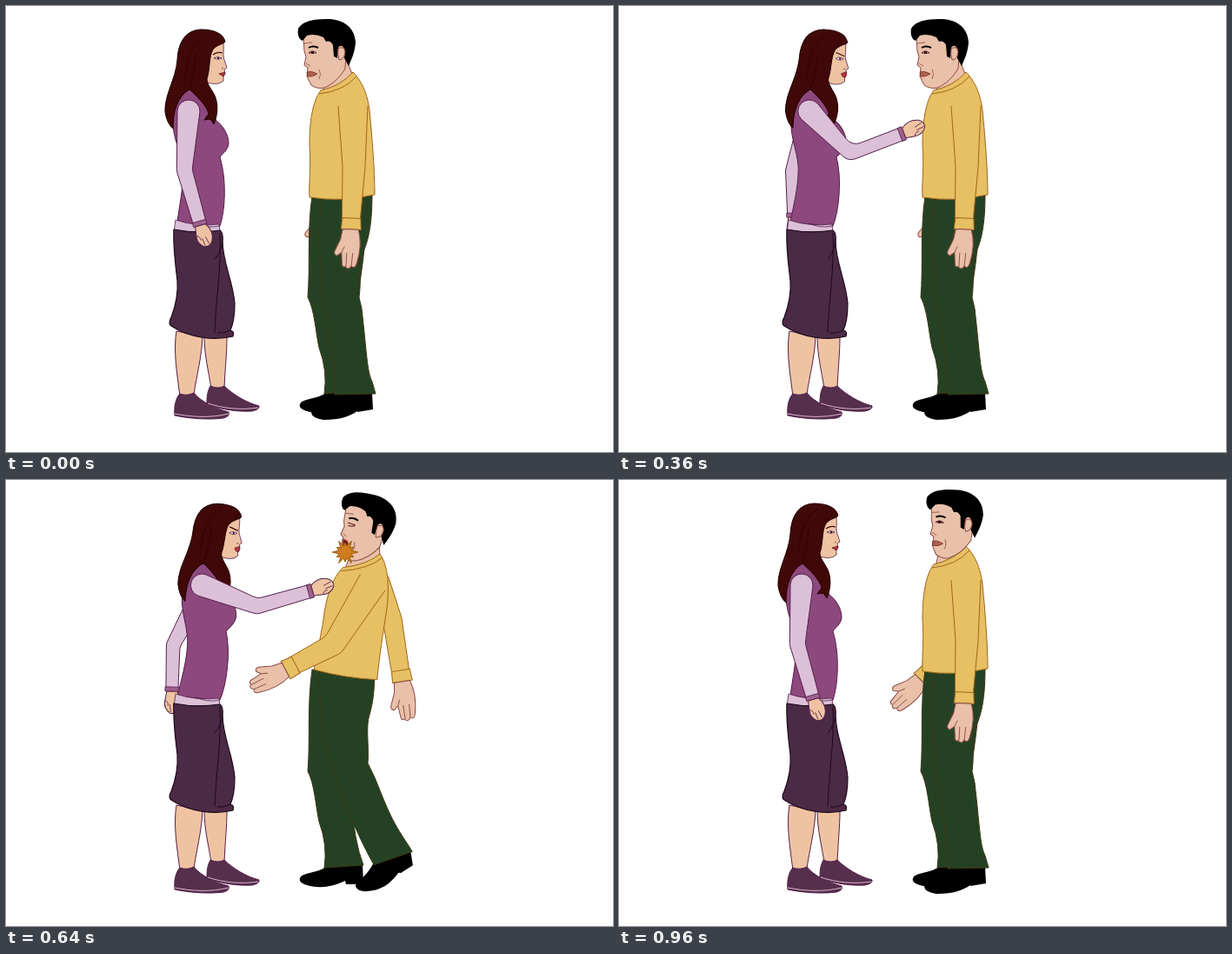
Recreate the animation shown at these times as an HTML page with a canvas. Size 698 by 513 pixels, loop 1200 ms.

```html
<!DOCTYPE html>
<html lang="en">
<head>
<meta charset="utf-8">
<title>Quarrel</title>
<style>
html, body { margin: 0; width: 100%; height: 100%; overflow: hidden; background: #fff; }
canvas { display: block; }
</style>
</head>
<body>
<canvas id="stage" width="698" height="513"></canvas>
<script>
const ctx = document.getElementById('stage').getContext('2d');
const LOOP = 1200, STEP = 40, RAD = Math.PI / 180;

const C = {
  top: '#8d487d', sleeve: '#dcc0d8', cuff: '#a0608f', skirt: '#4b2a45', wSkin: '#efc3a2', wShoe: '#562f4d',
  wHair: '#410808', wLine: '#54204a', sweater: '#e6c063', sLine: '#a2651c',
  pants: '#244223', pLine: '#3f3514', mSkin: '#e9c0a9', skinLine: '#8c4a44', black: '#000'
};

// Time, lean of the body, direction of the upper arm and of the forearm.
const SLAP = [
  [0, 0, 94, 74], [120, -2, 108, 1], [200, -2, 112, -4], [360, 8, 46, -21],
  [480, 15, 9, -31], [640, 14, 21, -16], [800, 4, 67, 42], [960, 0, 94, 74]
];

const lerp = (a, b, k) => Array.isArray(a) ? a.map((v, i) => lerp(v, b[i], k)) : a + (b - a) * k;
const ramp = (t, from, to) => Math.min(1, Math.max(0, (t - from) / (to - from)));
const easeOut = k => 1 - (1 - k) ** 2;
const polar = ([x, y], deg, r) => [x + r * Math.cos(deg * RAD), y + r * Math.sin(deg * RAD)];

function womanPose(t) {
  const i = Math.max(1, SLAP.findIndex(row => row[0] > t));
  const next = t < 960 ? i : SLAP.length - 1;
  const a = SLAP[next - 1], b = SLAP[next];
  const [, lean, upper, fore] = lerp(a, b, ramp(t, a[0], b[0]));
  const shoulder = [210 + lean * 1.1, 121];
  const elbow = polar(shoulder, upper, 68);
  return {
    lean, shoulder, elbow,
    wrist: polar(elbow, fore, 65),
    backShoulder: [209 + lean * 1.1, 130],
    backElbow: [209 - lean * 1.2, 190],
    backWrist: [214 - lean * 1.65, 242]
  };
}

function manPose(t) {
  const recover = ramp(t, 800, 960), jolt = ramp(t, 400, 480);
  const back = (.87 * ramp(t, 480, 570) + .13 * ramp(t, 570, 800)) * (1 - recover);
  const step = easeOut(ramp(t, 500, 800)) * (1 - recover);
  const elbow = lerp([400, 185], [374, 190], back);
  return {
    back, step, elbow,
    head: [16 * jolt + 31 * back, 5 * back - 4 * jolt],
    tilt: 4 * jolt + 10 * back,
    jolt,
    shoulder: lerp([399, 115], [424, 118], back),
    wrist: polar(elbow, lerp(93, 176, step), 72 - 11 * back),
    backShoulder: lerp([402, 120], [430, 115], back),
    backElbow: lerp([386, 190], [450, 158], back),
    backWrist: lerp([369 - 22 * recover, 241 - 11 * recover], [464, 231], back)
  };
}

// Blend two paths that share the same commands.
function morph(a, b, k) {
  const to = b.match(/-?[\d.]+/g);
  let i = 0;
  return a.replace(/-?[\d.]+/g, n => lerp(+n, +to[i++], k).toFixed(2));
}

function draw(d, fill, line, width = 1) {
  const p = new Path2D(d);
  if (fill) { ctx.fillStyle = fill; ctx.fill(p); }
  if (line) { ctx.strokeStyle = line; ctx.lineWidth = width; ctx.stroke(p); }
}

function local([x, y], angle, paint) {
  ctx.save();
  ctx.translate(x, y);
  ctx.rotate(angle);
  paint();
  ctx.restore();
}

function headSpace([dx, dy], deg, [cx, cy], paint) {
  local([cx + dx, cy + dy], deg * RAD, () => {
    ctx.translate(-cx, -cy);
    paint();
  });
}

const angle = (p, q) => Math.atan2(q[1] - p[1], q[0] - p[0]);
const side = (p, a, d) => [p[0] - Math.sin(a) * d, p[1] + Math.cos(a) * d];

// Tapered sleeve; returns the direction of the forearm.
function limb(s, e, w, [r0, r1, r2], fill, line, cap) {
  const a = angle(s, e), b = angle(e, w);
  const m = Math.atan2(Math.sin(a) + Math.sin(b), Math.cos(a) + Math.cos(b));
  ctx.beginPath();
  ctx.moveTo(...side(s, a, r0));
  ctx.arcTo(...side(e, m, r1), ...side(w, b, r2), 14);
  ctx.lineTo(...side(w, b, r2));
  ctx.lineTo(...side(w, b, -r2));
  ctx.arcTo(...side(e, m, -r1), ...side(s, a, -r0), 14);
  ctx.lineTo(...side(s, a, -r0));
  if (cap) ctx.arc(...s, r0, a - Math.PI / 2, a - Math.PI * 1.5, true);
  ctx.fillStyle = fill;
  ctx.fill();
  ctx.strokeStyle = line;
  ctx.lineWidth = 1;
  ctx.stroke();
  return b;
}

function womanHand(wrist, dir) {
  local(wrist, dir, () => {
    draw('M1,-6 C8,-11 16,-11 22,-8 Q28,-4 26,2 Q21,9 13,8 L1,6Z', C.wSkin, C.wLine);
    draw('M24,-4 L15,-2 M25,1 L16,2 M12,8 Q12,4 18,4', null, C.wLine, .8);
    draw('M-4,-8 L1,-8 L1,8 L-4,8Z', C.cuff, C.wLine, .8);
  });
}

function manHand(wrist, dir) {
  local(wrist, dir, () => {
    draw('M-13,-11 L0,-12 L0,11 L-13,10Z', C.sweater, C.sLine);
    draw('M0,-9 C12,-13 24,-13 39,-9 Q46,-7 42,-3 Q48,0 43,4 Q45,8 38,8 L27,9 L31,14 Q30,18 26,17 L12,11 L0,9Z',
      C.mSkin, C.skinLine);
    draw('M42,-3 L27,-4 M43,3 L27,3 M27,9 L20,6', null, C.skinLine, .9);
  });
}

function womanLegs() {
  draw('M196,374 C192,397 197,425 200,449 L216,447 C219,425 225,405 226,380Z', C.wSkin, C.wLine);
  draw('M228,380 C228,402 233,420 236,440 L251,440 C252,415 254,400 254,380Z', C.wSkin, C.wLine);
  draw('M235,437 C231,444 231,452 231,458 C247,464 265,467 283,466 Q292,464 291,460 C276,456 261,447 251,437 Q244,441 235,437Z',
    C.wShoe, C.wLine);
  draw('M200,446 C195,451 193,461 194,471 C212,475 235,476 250,474 Q258,472 256,467 C240,463 224,455 216,445 Q208,449 200,446Z',
    C.wShoe, C.wLine);
  draw('M194,469 C215,473 235,474 256,469 M232,457 C250,463 270,465 290,462', null, '#dcb4c8');
}

function womanHead(angry) {
  draw('M236,45 L250,42 C251,51 249,57 251,62 L254,71 L251,73 L252,78 L250,81 L250,86 Q244,92 231,88 L228,60Z',
    C.wSkin, C.wLine, .8);
  draw('M224,27 C206,28 198,42 197,62 C195,85 182,102 183,122 Q185,135 192,141 C192,122 197,104 211,96 C220,104 231,115 233,124 ' +
    'L228,131 L235,130 L239,136 C244,124 244,112 240,103 C236,95 231,90 231,84 C235,72 233,58 238,50 C243,44 250,44 252,41 C250,32 240,27 224,27Z',
    C.wHair, '#200');
  draw('M228,34 C213,42 208,63 206,85 M218,55 C217,78 213,88 211,96', null, '#250000', .7);
  draw('M239,60 Q243,57 248,60 Q244,63 239,60Z', '#fff', C.wLine, .8);
  draw('M243,59 h2 v2 h-2Z', '#341428');
  draw(angry ? 'M239,53 L249,57' : 'M238,56 Q243,52 249,54', null, C.wHair, 1.2);
  draw(angry ? 'M252,75 L246,77 Q247,82 251,81Z' : 'M252,76 L245,78 L250,81Z', '#b3393f', '#6d1425', .8);
  draw('M250,71 L248,72', null, C.wLine, .8);
}

function drawWoman(t) {
  const p = womanPose(t);
  womanHand(p.backWrist, limb(p.backShoulder, p.backElbow, p.backWrist, [11, 8, 7], C.sleeve, C.wLine));
  womanLegs();

  // The waist stays put while everything above it slants.
  const k = p.lean / 155;
  ctx.save();
  ctx.transform(1, 0, -k, 1, k * 252, 0);
  draw('M212,96 C199,100 191,115 192,138 C194,158 203,172 203,190 C204,212 199,230 197,249 L246,253 C252,236 254,200 246,174 ' +
    'C249,169 255,167 256,158 C256,148 250,138 241,131 C239,115 226,101 212,96Z', C.top, C.wLine);
  ctx.restore();
  draw('M195,246 Q218,254 245,251 L246,260 L193,260Z', C.sleeve, C.wLine, .8);
  draw('M218,250 Q232,256 245,253', null, C.wLine, .8);
  draw('M193,257 Q219,262 246,258 Q250,261 249,270 C249,295 261,316 263,342 Q263,362 258,373 Q263,374 261,380 ' +
    'C240,385 211,382 190,368 Q186,365 190,358 C195,345 198,330 197,316 C195,298 192,278 193,257Z', C.skirt, '#1d0a1a', 1.2);
  draw('M246,261 C248,300 241,340 240,376 M249,268 Q249,281 240,291 M258,373 Q251,377 243,376', null, '#1d0a1a');

  const offset = [p.lean * 1.15, Math.max(0, -p.lean * 1.5)];
  headSpace(offset, p.lean * .2, [222, 95], () => womanHead(t >= 280 && t < 840));
  womanHand(p.wrist, limb(p.shoulder, p.elbow, p.wrist, [13, 9, 7.5], C.sleeve, C.wLine, true));
}

function manHead(hurt) {
  draw('M342,36 L343,52 L345,58 L343,68 L347,71 L346,81 L351,91 Q358,96 366,94 C376,90 384,82 390,72 L392,45 L380,30 L345,30Z',
    C.mSkin, C.skinLine);
  draw('M341,40 C336,38 335,31 336,26 C342,16 357,15 372,15 C389,16 401,25 402,42 C401,54 397,62 394,69 L389,60 ' +
    'C391,48 386,42 382,48 L381,60 L377,58 L376,45 Q373,39 368,41 L365,36 Q355,31 346,34Z', C.black);
  draw('M382,49 Q389,45 390,53 Q389,62 383,62 Q381,56 382,49Z', C.mSkin, C.skinLine);
  draw('M348,48 Q353,45 359,48', null, C.black, 2);
  draw('M343,43 L352,42 M360,73 Q363,78 360,84 M345,66 L350,69', null, C.skinLine, .8);
  if (hurt) {
    draw('M348,53 L357,54 M349,56 Q354,57 357,54', null, '#551a22');
    draw('M346,73 Q354,72 354,79 Q351,85 347,82 Q350,78 346,73Z', '#5c0b12', '#a0503c', 1.4);
  } else {
    draw('M348,54 Q352,50 357,54Z', '#fff', '#551a22');
    draw('M351,52 h3 v3 h-3Z', '#2b1010');
    draw('M346,76 Q351,74 358,78 Q353,82 347,81Z', '#b0604e', '#743025', .8);
  }
}

function manLegs(step) {
  draw('M368,445 C358,452 345,451 339,456 Q335,462 343,465 C360,471 375,468 390,461 L391,465 L411,465 L410,442Z', C.black);
  draw('M352,218 C346,260 350,300 347,335 C355,350 356,375 360,393 Q370,420 366,446 L411,443 Q400,415 397,365 C409,320 414,270 416,222Z',
    C.pants, C.pLine);
  draw(morph(
    'M378,445 C370,455 355,462 351,468 Q352,474 365,476 C385,476 395,472 404,466 L404,467 L422,464 L421,445Z',
    'M440,439 C436,452 425,460 422,466 Q423,472 432,472 C450,471 460,462 470,446 L474,446 L486,435 L483,420Z', step), C.black);
  draw(morph(
    'M362,222 C358,280 363,330 367,350 C375,390 377,420 378,447 L425,446 L421,432 C415,420 415,400 409,348 ' +
    'L406,335 C409,315 405,298 408,290 C414,275 421,262 421,216Z',
    'M360,220 C360,290 375,325 390,352 C400,378 420,414 441,441 L484,420 L477,412 C455,380 450,375 430,340 ' +
    'L420,322 C421,310 418,285 420,270 C423,255 424,250 425,228Z', step), C.pants, C.pLine);
}

function drawMan(t) {
  const p = manPose(t), k = p.back;
  manHand(p.backWrist, limb(p.backShoulder, p.backElbow, p.backWrist, [13, 11, 10], C.sweater, C.sLine));
  manLegs(p.step);

  draw(morph(
    'M367,86 L364,100 Q385,95 398,78 L390,58Z',
    'M398,88 L392,104 Q418,100 433,88 L433,68Z', k), C.mSkin, C.skinLine);
  draw(morph(
    'M362,97 C352,110 349,135 349,160 C351,185 348,205 349,220 Q385,226 424,217 C424,190 421,150 418,120 C415,95 405,82 399,76 Q385,92 362,97Z',
    'M390,101 C378,112 372,130 368,150 C364,180 357,200 355,218 Q390,228 427,231 C431,195 434,185 440,150 C443,130 444,100 433,86 Q418,98 390,101Z', k),
    C.sweater, C.sLine);
  draw(morph('M360,101 Q388,98 403,81', 'M388,105 Q420,103 436,90', k), null, C.sLine);
  headSpace(p.head, p.tilt, [368, 55], () => manHead(t >= 440 && t < 920));
  manHand(p.wrist, limb(p.shoulder, p.elbow, p.wrist, [17, 13, 10], C.sweater, C.sLine));
}

function drawSpark(t) {
  if (t < 480 || t >= 720) return;
  const k = ramp(t, 480, 640);
  const center = lerp([361, 73], [390, 83], Math.min(1, k * 2));
  const size = lerp(8, 14, k);
  ctx.beginPath();
  for (let i = 0; i < 24; i++) {
    ctx.lineTo(...polar(center, i * 15, size * (i % 2 ? .52 : i % 4 ? .8 : 1.05)));
  }
  ctx.closePath();
  ctx.fillStyle = '#cf7d1e';
  ctx.fill();
  ctx.strokeStyle = '#9c5a08';
  ctx.lineWidth = 1;
  ctx.stroke();
}

function render(now) {
  const t = Math.floor((now % LOOP) / STEP) * STEP;
  ctx.fillStyle = '#fff';
  ctx.fillRect(0, 0, 698, 513);
  ctx.lineJoin = 'round';
  drawMan(t);
  drawSpark(t);
  drawWoman(t);
}

let start;
function tick(now) {
  start ??= now;
  render(now - start);
  requestAnimationFrame(tick);
}
requestAnimationFrame(tick);
</script>
</body>
</html>
```
